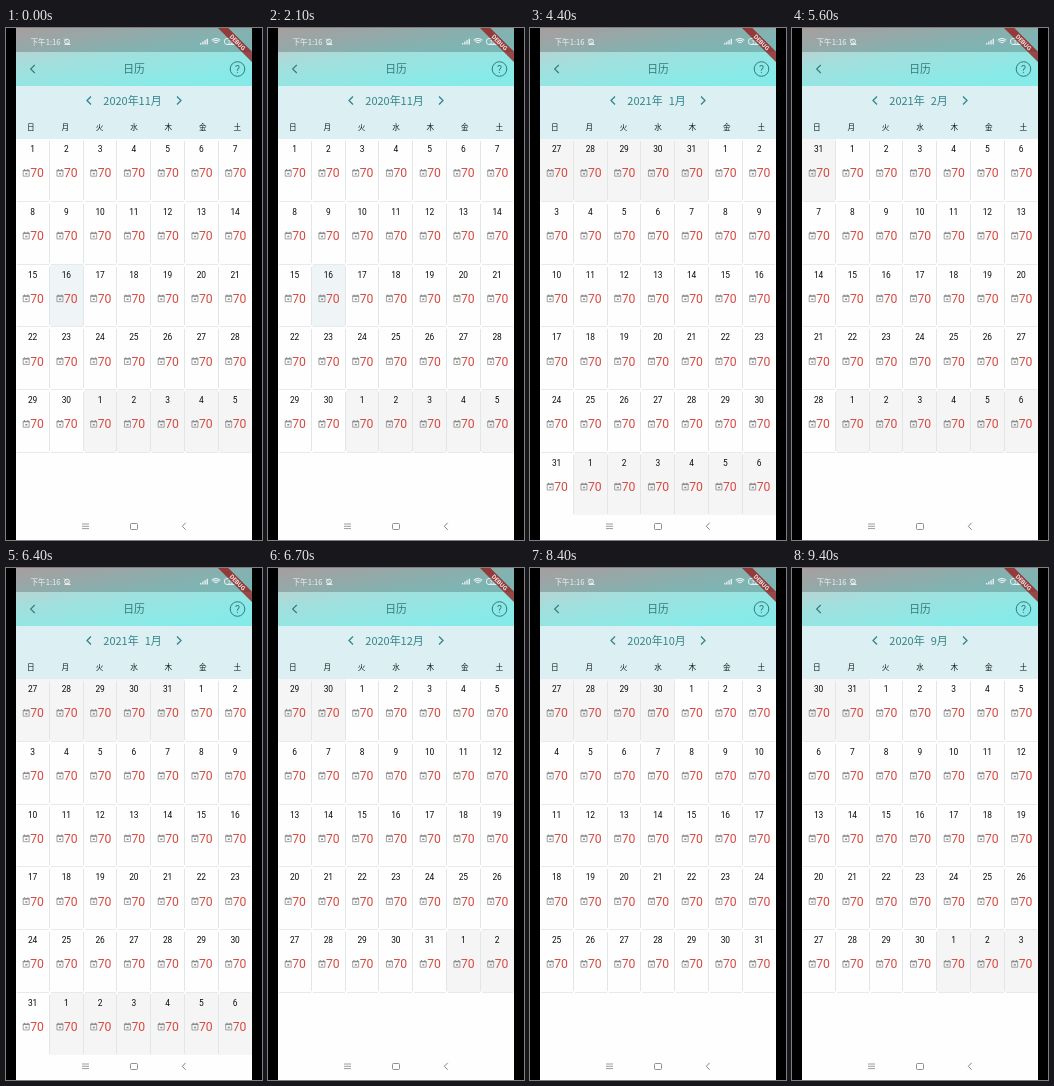
Write an HTML page with a canvas that moves like this. It is 256x512 px and loops after 9.9 s.

```html
<!DOCTYPE html>
<html lang="zh">
<head>
<meta charset="utf-8">
<style>
html, body { margin: 0; width: 100%; height: 100%; overflow: hidden; background: #000; }
canvas { display: block; width: 256px; height: 512px; }
</style>
</head>
<body>
<canvas id="stage" width="256" height="512"></canvas>
<script>
const ctx = document.getElementById('stage').getContext('2d');
const LOOP = 9900;
const LEFT = 10, RIGHT = 246, WIDTH = RIGHT - LEFT, TOP = 110;
const COL = 33.75, ROW = 62.75;
const CJK = '"Noto Sans CJK SC", "Noto Sans CJK", "Noto Sans CJK JP", sans-serif';
const LATIN = 'Roboto, sans-serif';
const WEEK = '日月火水木金土';

// [start time, year, month]
const VIEWS = [
  [0, 2020, 11], [2200, 2020, 12], [3200, 2021, 1], [4600, 2021, 2],
  [5700, 2021, 1], [6600, 2020, 12], [7400, 2020, 11], [8300, 2020, 10],
  [9300, 2020, 9]
];

function box(x, y, w, h, color) {
  ctx.fillStyle = color;
  ctx.fillRect(x, y, w, h);
}

function frame(x, y, w, h, color, width, radius = 0) {
  ctx.strokeStyle = color;
  ctx.lineWidth = width;
  ctx.beginPath();
  ctx.roundRect(x, y, w, h, radius);
  ctx.stroke();
}

function text(str, x, y, size, color, family = LATIN, align = 'center', weight = 400) {
  ctx.font = `${weight} ${size}px ${family}`;
  ctx.textAlign = align;
  ctx.textBaseline = 'alphabetic';
  ctx.fillStyle = color;
  ctx.fillText(str, x, y);
}

function line(points, color, width = 1) {
  ctx.strokeStyle = color;
  ctx.lineWidth = width;
  ctx.beginPath();
  points.forEach(([x, y]) => ctx.lineTo(x, y));
  ctx.stroke();
}

function arc(x, y, r, from, to, color, width = 1) {
  ctx.strokeStyle = color;
  ctx.lineWidth = width;
  ctx.beginPath();
  ctx.arc(x, y, r, from, to);
  ctx.stroke();
}

// dir -1 points left, 1 points right
function chevron(x, y, w, h, dir, color, width) {
  line([[x - dir * w, y - h], [x + dir * w, y], [x - dir * w, y + h]], color, width);
}

// one slanted gradient runs behind the status bar and the app bar
function header() {
  const g = ctx.createLinearGradient(LEFT, 0, LEFT + 12, 79);
  g.addColorStop(0, '#d2c5c5');
  g.addColorStop(0.5, '#a2dfdd');
  g.addColorStop(1, '#86ebe8');
  box(LEFT, 0, WIDTH, 58, g);
  box(LEFT, 0, WIDTH, 24, 'rgba(0, 0, 0, 0.2)');
}

function statusBar() {
  const ink = '#f1f3f3';
  text('下午1:16', 24.5, 17, 7.6, ink, CJK, 'left');
  arc(61, 13.5, 2.4, 0, 7, ink, 1);
  line([[58.5, 16.5], [64, 16.5]], ink, 0.9);
  line([[58, 10.5], [64.5, 17]], ink, 0.8);
  for (let i = 0; i < 4; i++) box(194 + i * 2.2, 15 - i * 1.4, 1.3, 1.5 + i * 1.4, ink);
  for (const r of [2, 4, 5.8]) arc(210, 16.3, r, -Math.PI * 0.76, -Math.PI * 0.24, ink, 1.1);
  frame(218.5, 10.5, 12, 6, ink, 0.9, 2.5);
  text('32', 224.5, 15.6, 5.5, ink);
}

function appBar() {
  const ink = '#357a7d';
  chevron(26.7, 41, 2.1, 4, -1, ink, 1.1);
  text('日历', 128, 45.2, 10.8, ink, CJK);
  arc(231.5, 41, 7.3, 0, 7, ink, 1);
  text('?', 231.5, 44.8, 10.5, ink);
}

function monthBar(year, month) {
  box(LEFT, 58, WIDTH, 53, '#dceff2');
  const ink = '#33858c';
  chevron(83, 72.5, 2, 4, -1, ink, 1.3);
  chevron(173, 72.5, 2, 4, 1, ink, 1.3);
  text(year + '年', 97.3, 76.6, 11, ink, CJK, 'left');
  text(month + '月', 155.8, 76.6, 11, ink, CJK, 'right');
  [...WEEK].forEach((d, i) => text(d, 24.8 + i * 34.4, 102, 7.6, '#161c1d', CJK));
}

function calendarIcon(x, y) {
  const ink = '#8c8c8c';
  frame(x + 0.5, y + 1.3, 6, 5.9, ink, 0.8);
  box(x + 0.3, y + 1, 6.4, 1.3, ink);
  box(x + 1.3, y, 1, 1.2, ink);
  box(x + 4.7, y, 1, 1.2, ink);
  box(x + 2.6, y + 4, 2, 1.5, ink);
}

function cell(col, row, day, fill) {
  const x = LEFT + col * COL, y = TOP + row * ROW;
  const x0 = Math.round(x), y0 = Math.round(y);
  const w = Math.min(RIGHT, Math.round(x + COL)) - x0;
  const h = Math.round(y + ROW) - y0;
  box(x0, y0 + 1, w, h - 1, fill);
  box(x0 + 1, y0 + h, w - 2, 1, '#e6eaea');
  if (col < 6) box(x0 + w - 1, y0 + 3, 1, h - 4, '#e3e6e6');
  const mid = 26.6 + col * COL;
  text(day, mid, y + 14, 8.4, '#0a0a0a');
  calendarIcon(mid - 9.9, y + 31);
  text('70', mid - 2.4, y + 39.3, 12.2, '#d64a42', LATIN, 'left');
}

function grid(year, month) {
  const lead = new Date(year, month - 1, 1).getDay();
  const days = new Date(year, month, 0).getDate();
  const count = Math.ceil((lead + days) / 7) * 7;
  for (let i = 0; i < count; i++) {
    const n = i - lead + 1;
    const date = new Date(year, month - 1, n);
    const today = year === 2020 && month === 11 && n === 16;
    const fill = today ? '#eff5f6' : n < 1 || n > days ? '#f5f5f5' : '#fefefe';
    cell(i % 7, Math.floor(i / 7), date.getDate(), fill);
  }
}

function navBar() {
  box(LEFT, 487, WIDTH, 25, '#fefefe');
  const ink = '#858585';
  for (const y of [496, 498.3, 500.6]) line([[76, y], [83, y]], ink, 0.8);
  frame(124.5, 495.5, 7, 6, ink, 0.9, 1);
  chevron(178, 498.3, 1.7, 3.5, -1, ink, 1);
}

function ribbon() {
  ctx.save();
  ctx.beginPath();
  ctx.rect(LEFT, 0, WIDTH, 512);
  ctx.clip();
  ctx.translate(RIGHT, 0);
  ctx.rotate(Math.PI / 4);
  box(-24, 16.8, 48, 7.2, 'rgba(0, 0, 0, 0.35)');
  box(-24, 16.8, 48, 7.2, 'rgba(183, 28, 28, 0.63)');
  text('DEBUG', 0, 22.6, 6.1, '#f0e4e4', LATIN, 'center', 700);
  ctx.restore();
}

function draw(now) {
  const t = now % LOOP;
  const [, year, month] = VIEWS.filter(v => v[0] <= t).pop();
  box(0, 0, 256, 512, '#000');
  box(LEFT, 0, WIDTH, 512, '#fefefe');
  header();
  statusBar();
  appBar();
  monthBar(year, month);
  grid(year, month);
  navBar();
  ribbon();
}

let start;
function tick(now) {
  start ??= now;
  draw(Math.max(0, now - start));
  requestAnimationFrame(tick);
}
draw(0);
requestAnimationFrame(tick);
</script>
</body>
</html>
```
